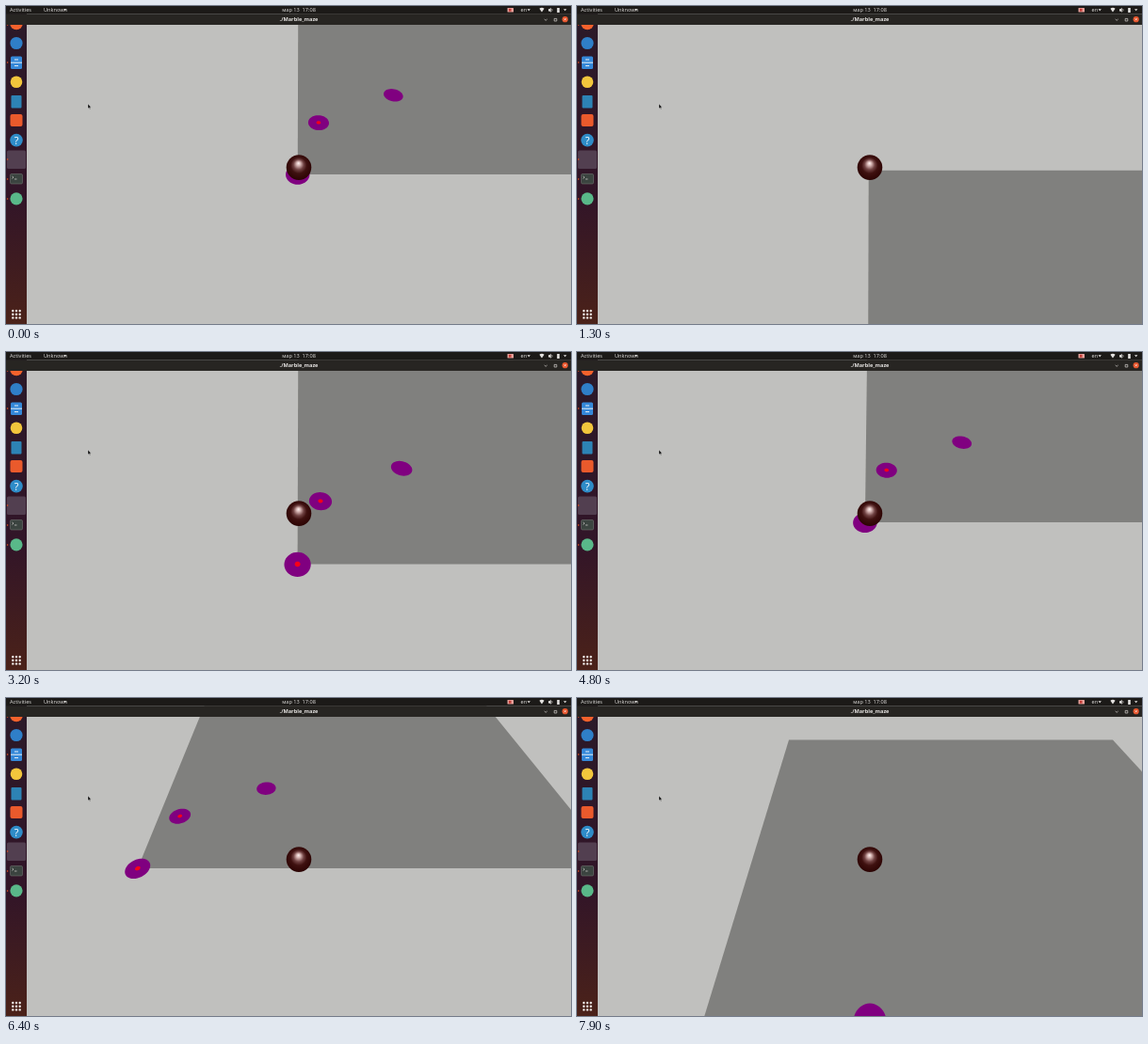
Recreate the animation shown at these times as an HTML page. Size 600 px wide and 338 px high, loop 8000 ms.

```html
<!DOCTYPE html>
<html lang="en">
<head>
<meta charset="utf-8">
<title>Marble maze</title>
<style>
  html, body { margin: 0; height: 100%; overflow: hidden; background: #c0c0be; }
  svg { display: block; width: 100vw; height: 100vh; }
  text { font: 5.6px "Open Sans", "Noto Sans", sans-serif; fill: #e4e2e0; }
  .bold { font-weight: 700; }
  .mid { text-anchor: middle; }
  .line { fill: none; stroke: #d8d5d2; stroke-width: .7; }
</style>
</head>
<body>
<svg viewBox="0 0 600 338">
  <defs>
    <radialGradient id="shine" gradientUnits="userSpaceOnUse" cx="311" cy="172" r="17" fx="310.6" fy="167">
      <stop offset="0" stop-color="#fff4f2"/>
      <stop offset=".13" stop-color="#d5b4b2"/>
      <stop offset=".32" stop-color="#704242"/>
      <stop offset=".5" stop-color="#3f1110"/>
      <stop offset=".75" stop-color="#300605"/>
      <stop offset="1" stop-color="#180000"/>
    </radialGradient>
    <linearGradient id="dockFill" x2="0" y2="1">
      <stop offset="0" stop-color="#2b1a29"/>
      <stop offset=".6" stop-color="#321528"/>
      <stop offset="1" stop-color="#4b2219"/>
    </linearGradient>
  </defs>

  <path id="floor" fill="#80807e"/>
  <path id="holes" fill="#800080"/>
  <path id="cores" fill="#f80018"/>
  <circle cx="311" cy="171.6" r="13.3" fill="url(#shine)"/>
  <path d="M87 104v5l1.2-1 .8 1.7.8-.4-.8-1.6h1.5z" fill="#111" stroke="#eee" stroke-width=".3"/>

  <g id="dock">
    <rect y="8" width="22" height="330" fill="url(#dockFill)"/>
    <rect x="1" y="153.500" width="20" height="19.500" rx="1.500" fill="#523f50"/>
    <circle cx="11" cy="18.500" r="6.800" fill="#f4622c"/>
    <circle cx="11" cy="39.500" r="6.600" fill="#2f7fc8"/>
    <rect x="5" y="53.500" width="12" height="13.500" rx="1.500" fill="#3588d8"/>
    <path d="M5 60.200h12M9 57h4M9 63.600h4" stroke="#e6f0f8" stroke-width="1"/>
    <circle cx="11" cy="80.800" r="6.300" fill="#f2c63c"/>
    <rect x="5.500" y="95" width="11" height="13.500" rx="1" fill="#2d83b5"/>
    <rect x="4.500" y="115" width="13" height="13" rx="2" fill="#ea5a2c"/>
    <circle cx="11" cy="142.600" r="6.800" fill="#2f8cc8"/>
    <text class="mid" x="11" y="146.600" style="font-size:11px;fill:#fff">?</text>
    <rect x="4.500" y="178.500" width="13" height="10.500" rx="1.300" fill="#3b4440" stroke="#78807b" stroke-width=".5"/>
    <path d="M6.500 181l1.500 1.200-1.500 1.200M9 184h2.500" class="line"/>
    <circle cx="11" cy="204.800" r="6.600" fill="#59b889"/>
  </g>

  <rect width="600" height="8.500" fill="#1c1a18"/>
  <rect y="8.500" width="600" height="11.500" fill="#272522"/>
  <text x="4" y="6.200">Activities</text>
  <text x="40" y="6.200">Unknown</text>
  <text class="mid" x="311" y="6.200" xml:space="preserve">мар 13  17:08</text>
  <text class="bold mid" x="311" y="16.200">./Marble_maze</text>
  <text x="546.500" y="6.200">en</text>
  <g fill="#e4e2e0">
    <path d="M64-.4m-3 3.600h3.400l-1.700 2zM553.500 3.200h3.400l-1.700 2zM592 3.200h3.400l-1.700 2z"/>
    <path d="M566.400 2.800q2.600-2 5.200 0l-2.600 3.700zM576 3.200h1.200l1.500-1.400v5l-1.500-1.400H576zM585.200 2h2.600v5h-2.600z"/>
    <rect x="532.500" y="2" width="6.500" height="4.500" rx=".6" fill="#e6a19b"/>
    <path d="M534 2.800h2.500v2.900H534z" fill="#c53b35"/>
  </g>
  <path class="line" d="M579.600 3q1 1.300 0 2.600M571.700 14l1.500 1.300 1.500-1.300M582.200 13.400h2.600V16h-2.600z"/>
  <circle cx="593.700" cy="14.200" r="3.100" fill="#e7562d"/>
  <path d="M592.600 13.100l2.200 2.200m0-2.200l-2.200 2.200" stroke="#fff" stroke-width=".6"/>
</svg>

<script>
const LOOP = 8000, STEP = 100;
const CENTER_X = 311, HORIZON = -237, FOCAL = 500;
const UNIT = 0.00611;          // a tenth of one maze cell
const START_DEPTH = 1.202, FLOOR = 200;
const byId = id => document.getElementById(id);

// Each key event adds one to the marble's speed, so distance is a triangular sum.
const travel = events => events * (events + 1) / 2;

// Marble position: distance ahead and distance to the side.
function forwardAt(t) {
  if (t < 100) return 0;
  if (t < 700) return 1;
  if (t < 2100) return Math.min(198, 1 + travel(1.37 + 3 * (t - 700) / STEP));
  if (t < 2500) return 197;
  if (t < 2800) return 197 - travel(4 + 3 * (t - 2500) / STEP);
  if (t < 3600) return Math.max(-1, 197 - travel(10 + (t - 2700) / 60));
  if (t < 3900) return 0;
  if (t < 6900) return 1;
  if (t < 7400) return 2;
  return 1 + travel(2 + 2.4 * (t - 7400) / STEP);
}

function sideAt(t) {
  if (t < 4300) return 0.5;
  if (t < 4800) return 1;
  if (t < 5700) return Math.min(96, travel(1.56 + 2.37 * (t - 4800) / STEP));
  if (t < 6200) return 95;
  return Math.max(50, 95 - travel(3 + 2 * (t - 6200) / STEP));
}

function draw(t) {
  const side = sideAt(t), forward = forwardAt(t);
  const depthOf = z => START_DEPTH + (z - forward) * UNIT;

  const project = (x, z) => {
    const scale = FOCAL / Math.max(0.4, depthOf(z));
    const px = CENTER_X + (x - side) * UNIT * scale;
    return `${px.toFixed(2)} ${(HORIZON + scale).toFixed(2)}`;
  };
  const outline = points => `M${points.map(p => project(...p)).join("L")}Z`;
  const disc = radius => ([x, z]) => depthOf(z) < 0.6 ? "" :
    outline(Array.from({ length: 40 }, (_, i) => {
      const angle = i * Math.PI / 20;
      return [x + radius * Math.cos(angle), z + radius * Math.sin(angle)];
    }));

  const spots = [[0, 0], [10, 30], [50, 50]];
  byId("floor").setAttribute("d", outline([[0, 0], [0, FLOOR], [FLOOR, FLOOR], [FLOOR, 0]]));
  byId("holes").setAttribute("d", spots.map(disc(5)).join(""));
  byId("cores").setAttribute("d", spots.slice(0, 2).map(disc(1.05)).join(""));
}

function addDot(x, y, radius, color) {
  const dot = document.createElementNS(byId("dock").namespaceURI, "circle");
  const attrs = { cx: x, cy: y, r: radius, fill: color };
  for (const name in attrs) dot.setAttribute(name, attrs[name]);
  byId("dock").append(dot);
}
for (const y of [17, 20, 60, 163, 184, 205]) addDot(1.6, y, 0.8, "#e95420");
for (let i = 0; i < 9; i++) addDot(7.3 + i % 3 * 3.7, 324 + Math.floor(i / 3) * 3.7, 1.2, "#f0ecea");

const origin = performance.now();
function tick() {
  const t = (performance.now() - origin) % LOOP;
  draw(Math.floor(t / STEP) * STEP);
  requestAnimationFrame(tick);
}
tick();
</script>
</body>
</html>
```
